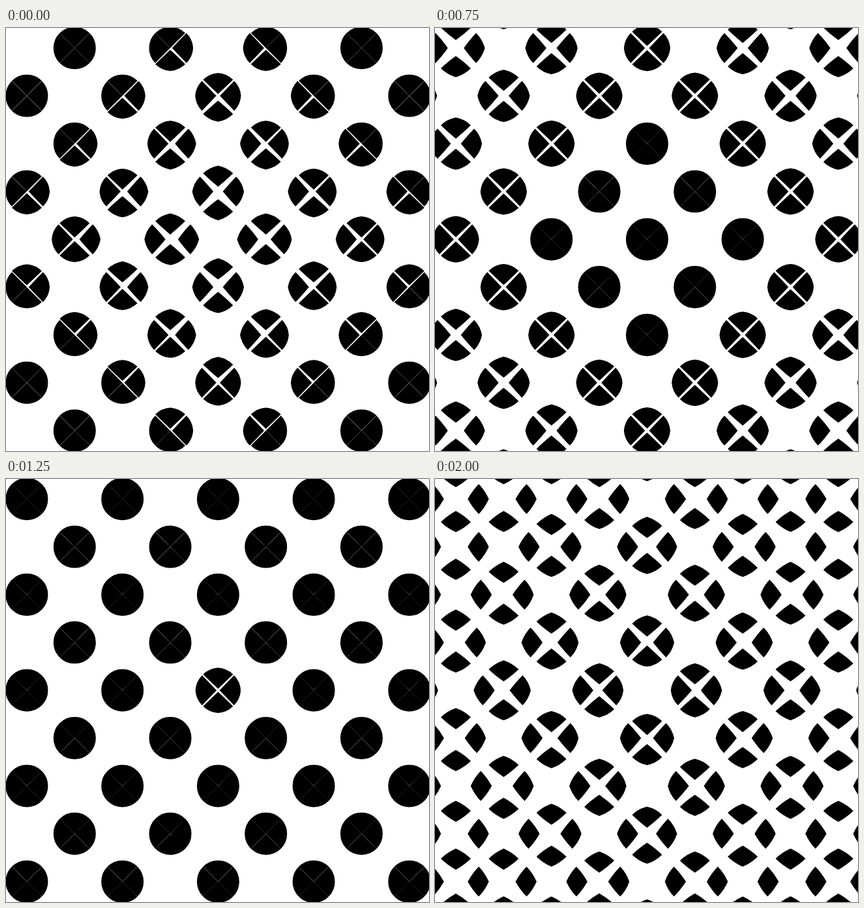
An HTML page without scripts that plays this animation: 649 by 649 pixels, repeating every 2.25 s.

```html
<!DOCTYPE html>
<html lang="en">
<head>
<meta charset="utf-8">
<title>Bursting dots</title>
<style>
  html, body { margin: 0; width: 100%; height: 100%; overflow: hidden; background: #fff; }
  svg { display: block; width: 100vw; height: 100vh; }

  /* Four quarter discs fly out and become quarters of the neighbouring discs.
     --a to --i: progress in each of the nine steps of the loop. */
  path {
    animation: burst 2250ms infinite;
    animation-timing-function: linear(
      var(--a) 0% 11.11%, var(--b) 11.11% 22.22%, var(--c) 22.22% 33.33%,
      var(--d) 33.33% 44.44%, var(--e) 44.44% 55.55%, var(--f) 55.55% 66.66%,
      var(--g) 66.66% 77.77%, var(--h) 77.77% 88.88%, var(--i) 88.88% 100%);
  }
  @keyframes burst {
    from { d: path("M.15 0Q18.5 -18.3 31.4 -31.3Q44.3 -18.3 44.3 0Q44.3 18.3 31.4 31.3Q18.5 18.3 .15 0Z M0 .15Q18.3 18.5 31.3 31.4Q18.3 44.3 0 44.3Q-18.3 44.3 -31.3 31.4Q-18.3 18.5 0 .15Z M-.15 0Q-18.5 18.3 -31.4 31.3Q-44.3 18.3 -44.3 0Q-44.3 -18.3 -31.4 -31.3Q-18.5 -18.3 -.15 0Z M0 -.15Q-18.3 -18.5 -31.3 -31.4Q-18.3 -44.3 0 -44.3Q18.3 -44.3 31.3 -31.4Q18.3 -18.5 0 -.15Z"); }
    to { d: path("M55.7 0Q55.7 -18.3 68.6 -31.3Q81.5 -18.3 99.85 0Q81.5 18.3 68.6 31.3Q55.7 18.3 55.7 0Z M0 55.7Q18.3 55.7 31.3 68.6Q18.3 81.5 0 99.85Q-18.3 81.5 -31.3 68.6Q-18.3 55.7 0 55.7Z M-55.7 0Q-55.7 18.3 -68.6 31.3Q-81.5 18.3 -99.85 0Q-81.5 -18.3 -68.6 -31.3Q-55.7 -18.3 -55.7 0Z M0 -55.7Q-18.3 -55.7 -31.3 -68.6Q-18.3 -81.5 0 -99.85Q18.3 -81.5 31.3 -68.6Q18.3 -55.7 0 -55.7Z"); }
  }

  /* Rings by city-block distance; each lags 100 ms behind the one inside it. */
  .r0 { --a:.713; --b:.415; --c:.132; --d:0; --e:-.004; --f:.055; --g:.333; --h:.611; --i:.889; }
  .r2 { --a:.824; --b:.526; --c:.243; --d:0; --e:0; --f:0; --g:.222; --h:.5; --i:.778; }
  .r4 { --a:.935; --b:.637; --c:.354; --d:.076; --e:0; --f:0; --g:.111; --h:.389; --i:.667; }
  .r6 { --a:1; --b:.748; --c:.465; --d:.187; --e:0; --f:0; --g:0; --h:.278; --i:.556; }
  .r8 { --a:1; --b:.859; --c:.576; --d:.298; --e:.017; --f:0; --g:0; --h:.167; --i:.445; }
</style>
</head>
<body>
<svg viewBox="0 0 649 649">
  <g transform="translate(325.4 324.2) scale(.7336)">
    <g class="r0"><path/></g>
    <g class="r2">
      <path transform="translate(-200 0)"/><path transform="translate(200 0)"/>
      <path transform="translate(0 -200)"/><path transform="translate(0 200)"/>
      <path transform="translate(-100 -100)"/><path transform="translate(100 -100)"/>
      <path transform="translate(-100 100)"/><path transform="translate(100 100)"/>
    </g>
    <g class="r4">
      <path transform="translate(-400 0)"/><path transform="translate(400 0)"/>
      <path transform="translate(0 -400)"/><path transform="translate(0 400)"/>
      <path transform="translate(-300 -100)"/><path transform="translate(300 -100)"/>
      <path transform="translate(-300 100)"/><path transform="translate(300 100)"/>
      <path transform="translate(-100 -300)"/><path transform="translate(100 -300)"/>
      <path transform="translate(-100 300)"/><path transform="translate(100 300)"/>
      <path transform="translate(-200 -200)"/><path transform="translate(200 -200)"/>
      <path transform="translate(-200 200)"/><path transform="translate(200 200)"/>
    </g>
    <g class="r6">
      <path transform="translate(-400 -200)"/><path transform="translate(400 -200)"/>
      <path transform="translate(-400 200)"/><path transform="translate(400 200)"/>
      <path transform="translate(-200 -400)"/><path transform="translate(200 -400)"/>
      <path transform="translate(-200 400)"/><path transform="translate(200 400)"/>
      <path transform="translate(-300 -300)"/><path transform="translate(300 -300)"/>
      <path transform="translate(-300 300)"/><path transform="translate(300 300)"/>
      <path transform="translate(-500 -100)"/><path transform="translate(500 -100)"/>
      <path transform="translate(-500 100)"/><path transform="translate(500 100)"/>
      <path transform="translate(-100 -500)"/><path transform="translate(100 -500)"/>
      <path transform="translate(-100 500)"/><path transform="translate(100 500)"/>
    </g>
    <g class="r8">
      <path transform="translate(-400 -400)"/><path transform="translate(400 -400)"/>
      <path transform="translate(-400 400)"/><path transform="translate(400 400)"/>
      <path transform="translate(-500 -300)"/><path transform="translate(500 -300)"/>
      <path transform="translate(-500 300)"/><path transform="translate(500 300)"/>
      <path transform="translate(-300 -500)"/><path transform="translate(300 -500)"/>
      <path transform="translate(-300 500)"/><path transform="translate(300 500)"/>
    </g>
  </g>
</svg>
</body>
</html>
```
